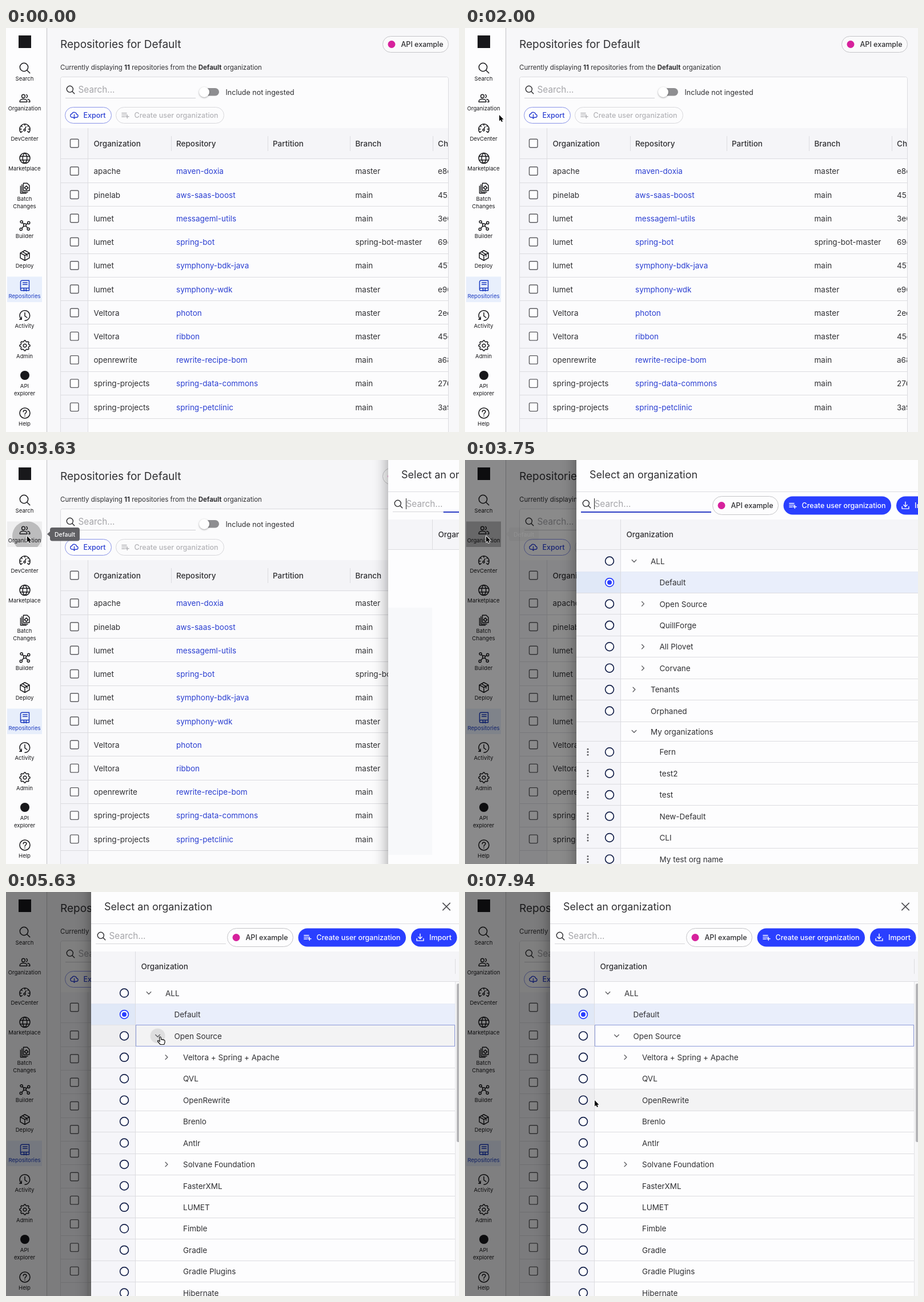
Animation, 793 px wide and 706 px high, one loop 8 s. Source, as an HTML page with a canvas:

```html
<!DOCTYPE html>
<html lang="en">
<head>
<meta charset="utf-8">
<title>Organization picker</title>
<style>
html, body { margin: 0; width: 100%; height: 100%; overflow: hidden; background: #f7f7f9; }
canvas { display: block; }
</style>
</head>
<body>
<canvas id="stage" width="793" height="706"></canvas>
<script>
const ctx = document.getElementById('stage').getContext('2d');
const W = 793, H = 706, LOOP = 8000, STEP = 62.5;
const INK = '#303033', DARK = '#18181b', BLUE = '#2b3fd2', VIVID = '#2a3fff', LINE = '#dcdce0', PINK = '#d6219c';
const BODY = 13.5;
const DRAWER_X = 149, ROW = 37.43, ROWS_TOP = 157.8;
const OPEN_AT = 3613.2, OPEN_MS = 209, PRESS_AT = 3500, EXPAND_AT = 5390;

const clamp = v => Math.min(1, Math.max(0, v));
const span = (t, a, b) => clamp((t - a) / (b - a));
const smooth = v => v * v * (3 - 2 * v);

// Cubic easing with control points (x1, 0) and (x2, 1).
function bezier(x, x1, x2) {
  let lo = 0, hi = 1;
  for (let i = 0; i < 24; i++) {
    const s = (lo + hi) / 2, r = 1 - s;
    if (3 * r * r * s * x1 + 3 * r * s * s * x2 + s ** 3 < x) lo = s; else hi = s;
  }
  return 3 * (1 - lo) * lo * lo + lo ** 3;
}

// ---- drawing helpers ----
function rect(x, y, w, h, color) { ctx.fillStyle = color; ctx.fillRect(x, y, w, h); }
const hline = (x1, x2, y, color = LINE, w = 1) => rect(x1, Math.round(y), x2 - x1, w, color);
const vline = (x, y1, y2, color = LINE) => rect(Math.round(x), y1, 1, y2 - y1, color);

function text(str, x, y, size, color = INK, weight = 400, align = 'left') {
  ctx.font = `${weight} ${size}px Inter, sans-serif`;
  ctx.fillStyle = color;
  ctx.textAlign = align;
  ctx.fillText(str, x, y + size * 0.36);
  return ctx.measureText(str).width;
}
function box(x, y, w, h, r, fill, stroke, lw = 1) {
  ctx.beginPath();
  ctx.roundRect(x, y, w, h, r);
  if (fill) { ctx.fillStyle = fill; ctx.fill(); }
  if (stroke) { ctx.strokeStyle = stroke; ctx.lineWidth = lw; ctx.stroke(); }
}
function disc(x, y, r, fill, stroke, lw) { box(x - r, y - r, 2 * r, 2 * r, r, fill, stroke, lw); }

function icon(path, x, y, size, color = DARK, lw = 1.5) {
  const k = size / 24;
  ctx.save();
  ctx.translate(x - size / 2, y - size / 2);
  ctx.scale(k, k);
  ctx.strokeStyle = color;
  ctx.lineWidth = lw / k;
  ctx.lineJoin = ctx.lineCap = 'round';
  ctx.stroke(new Path2D(path));
  ctx.restore();
}
const ring = (x, y, r) => `M${x + r} ${y}a${r} ${r} 0 1 1 ${-2 * r} 0a${r} ${r} 0 1 1 ${2 * r} 0`;

function gearPath() {
  let d = ring(12, 12, 3.4);
  for (let i = 0; i < 32; i++) {
    const a = (i - 0.5) / 32 * 2 * Math.PI, r = i % 4 < 2 ? 10.8 : 8.6;
    d += `${i ? 'L' : 'M'}${12 + r * Math.cos(a)} ${12 + r * Math.sin(a)}`;
  }
  return d + 'Z';
}
const ICON = {
  search: ring(10.2, 10.2, 8.6) + 'M16.4 16.4L22.5 22.5',
  people: ring(9, 8, 3.5) + 'M1.5 20v-1.5c0-3 4-4.5 7.5-4.5s7.5 1.5 7.5 4.5V20zM15 4.7a3.5 3.5 0 0 1 0 6.6M18 14.3c3 .7 4.5 2.2 4.5 4.2V20h-2.5',
  gauge: 'M3.2 21A11 11 0 1 1 20.8 21L17.5 19M3.2 21L6.5 19M1.5 14h3.2M19.3 14h3.2M12 3.4v3M4.4 6.8l2 2M19.6 6.8l-1.5 1.5M12 14l2.5-5' + ring(11.5, 16, 2),
  globe: ring(12, 12, 10.8) + 'M12 1.2c-6 5-6 16.6 0 21.6c6-5 6-16.6 0-21.6M2.5 8h19M2.5 16h19',
  batch: 'M9 1.5h8l4.5 4.5v11H9zM6 4.5v15.5h12M3 7.5v15h12' + ring(15, 11, 2.8) + 'M15 6.9v1.3M15 13.8v1.3M11 11h1.2M17.8 11h1.2',
  nodes: ring(12, 11, 2.8) + ring(5, 4.5, 2.5) + ring(20, 6.5, 2.5) + ring(4, 20, 2.5) + ring(19.5, 19.5, 2.5) + 'M7 6.3l3 2.8M14.5 10l3-2M10 13l-4 5M14 13l4 4.6',
  cube: 'M12 1.5L21.5 6.8V17.2L12 22.5L2.5 17.2V6.8zM2.5 6.8L12 12L21.5 6.8M12 12V22.5M7 4.3l9.6 5.4v4',
  book: 'M21 17.5V1.5H6a3 3 0 0 0-3 3V20a2.5 2.5 0 0 0 2.5 2.5H9M21 17.5H6a2.8 2.8 0 0 0-3 2.5M21 17.5v5h-5M10 17.5v6l2.5-2l2.5 2v-6M8 6h9M8 10h9',
  history: 'M5 20A10.5 10.5 0 1 1 12 22.5M5 20v-5M5 20H.8M12 6v7l4.5 3.2',
  gear: gearPath(),
  help: ring(12, 12, 10.8) + 'M8.7 9.2c.2-4.4 6.8-4.2 6.7-.2c-.1 2.8-3.3 2.6-3.4 5.6M12 17.8v.4',
  cloud: 'M7 18H6a5 5 0 0 1-.6-9.9A7 7 0 0 1 18.8 9.5A4.3 4.3 0 0 1 19 18h-2M12 10v11M8.5 17.5L12 21l3.5-3.5',
  listAdd: 'M3 6h13M3 11h13M3 16h8M18 11v9M13.5 15.5h9',
  tray: 'M12 2v13M7 10.5l5 5l5-5M2.5 15v6h19v-6',
  close: 'M3 3L21 21M21 3L3 21',
  right: 'M8.5 5l7 7l-7 7',
  down: 'M5 8.5l7 7l7-7'
};

// ---- main page ----
const MENU = [
  ['search', 70, 'Search'], ['people', 122.5, 'Organization'], ['gauge', 175, 'DevCenter'],
  ['globe', 227.5, 'Marketplace'], ['batch', 280, 'Batch', 'Changes'], ['nodes', 345, 'Builder'],
  ['cube', 397.5, 'Deploy'], ['book', 450, 'Repositories'], ['history', 502.5, 'Activity'],
  ['gear', 555, 'Admin'], ['dot', 607, 'API', 'explorer'], ['help', 673, 'Help']
];
const REPOS = [
  ['apache', 'maven-doxia', 'master', 'e8c1'], ['pinelab', 'aws-saas-boost', 'main', '4521'],
  ['lumet', 'messageml-utils', 'main', '3e07'], ['lumet', 'spring-bot', 'spring-bot-master', '69c4'],
  ['lumet', 'symphony-bdk-java', 'main', '4570'], ['lumet', 'symphony-wdk', 'master', 'e902'],
  ['Veltora', 'photon', 'master', '2ee8'], ['Veltora', 'ribbon', 'master', '45c3'],
  ['openrewrite', 'rewrite-recipe-bom', 'main', 'a683'],
  ['spring-projects', 'spring-data-commons', 'main', '2761'],
  ['spring-projects', 'spring-petclinic', 'main', '3a95']
];

function sidebar(t) {
  rect(0, 0, 71, H, '#fdfdfe');
  vline(71, 0, H, '#c2c2c6');
  box(22, 13, 22, 22, 0, DARK);
  rect(2, 434.5, 61, 44.5, '#e8effc');
  const hover = span(t, 3400, 3480) * (1 - span(t, 3850, 4000));
  if (hover > 0) {
    ctx.save();
    ctx.globalAlpha = hover;
    rect(2, 107.5, 61, 44.5, '#f0f0f1');
    ctx.beginPath();
    ctx.rect(2, 107.5, 61, 44.5);
    ctx.clip();
    if (t >= PRESS_AT) disc(37, 133, 10 + 16 * span(t, PRESS_AT, 3625) + 22 * span(t, 3625, 3740), '#bdbdbe');
    ctx.restore();
  }
  for (const [name, y, ...labels] of MENU) {
    const color = name === 'book' ? '#1c3cc0' : DARK;
    if (name === 'dot') disc(33, y, 8, DARK);
    else icon(ICON[name], 33, y, 20, color);
    labels.forEach((s, i) => text(s, 32.5, y + 18.5 + 13 * i, 9.6, color, 400, 'center'));
  }
}
function searchField(x, y) {
  icon(ICON.search, x, y, 15.5, '#2b2b2e', 1.4);
  text('Search...', x + 13.5, y - 1, 15.3, '#a5a5a9');
}
function pill(x, y, w, h, label, glyph, color, fill, border) {
  box(x + 0.5, y + 0.5, w - 1, h - 1, h / 2, fill, border);
  const cy = y + h / 2;
  if (glyph === 'dot') disc(x + 16, cy, 6.5, PINK);
  else icon(ICON[glyph], x + 16.5, cy, 15, color, 1.4);
  text(label, x + 32.5, cy, 12.5, color, 500);
}
const checkbox = y => box(112.5, y - 7.2, 14.5, 14.5, 2, '#fdfdfe', '#5c5c60', 1.4);

function page(t) {
  rect(0, 0, W, H, '#f7f7f9');
  sidebar(t);
  text('Repositories for Default', 95, 28, 19);
  pill(659, 14, 116, 29, 'API example', 'dot', INK, '#fafafb', '#c4c4c8');
  let x = 95;
  [['Currently displaying '], ['11', 700], [' repositories from the '], ['Default', 700], [' organization']]
    .forEach(([s, weight]) => { x += text(s, x, 68.5, 11.5, INK, weight); });

  rect(95, 85, 680, H, '#fcfcfd');
  searchField(113, 108);
  hline(104, 332, 122, '#cfcfd3');
  box(345, 105, 28, 13.5, 7, '#8e8e91');
  ctx.save();
  ctx.shadowColor = 'rgba(0,0,0,.35)';
  ctx.shadowBlur = 3;
  ctx.shadowOffsetY = 1;
  disc(347, 112, 9, '#fff');
  ctx.restore();
  text('Include not ingested', 384.5, 112, 12.5);
  pill(103, 138, 82, 29, 'Export', 'cloud', BLUE, '#fdfdfe', '#8993e8');
  pill(192, 138, 190, 29, 'Create user organization', 'listAdd', '#b4b4b8', null, '#d8d8dc');

  rect(95, 175, 680, 53, '#f5f5f8');
  rect(95, 228, 49, H, '#f5f5f9');
  vline(143, 175, H);
  hline(95, 775, 228);
  checkbox(201.5);
  const cols = [153.5, 298, 467, 611.5, 756];
  ctx.save();
  ctx.beginPath();
  ctx.rect(95, 85, 679, H);
  ctx.clip();
  ['Organization', 'Repository', 'Partition', 'Branch', 'Changeset'].forEach((s, i) => {
    text(s, cols[i], 202, BODY, INK, 500);
    if (i) vline(cols[i] - 9.5, 189, 215);
  });
  REPOS.forEach(([org, repo, branch, hash], i) => {
    const y = 250 + 41.23 * i;
    checkbox(y);
    [org, repo, '', branch, hash].forEach((s, c) => text(s, cols[c], y + 0.5, BODY, c === 1 ? BLUE : INK));
    hline(95, 775, y + 20);
  });
  ctx.restore();
  box(95.5, 85.5, 679, 700, 3, null, LINE);
}

function tooltip(t) {
  const alpha = span(t, 3440, 3520) * (1 - 0.9 * span(t, 3640, 3750)) * (1 - span(t, 3755, 3810));
  if (alpha <= 0) return;
  ctx.save();
  ctx.globalAlpha = alpha;
  box(77, 118, 52, 23.5, 4, '#606064');
  ctx.beginPath();
  ctx.moveTo(72, 129.5);
  ctx.lineTo(77.5, 124.5);
  ctx.lineTo(77.5, 134.5);
  ctx.fill();
  text('Default', 103, 130, 10.5, '#fff', 500, 'center');
  ctx.restore();
}

// ---- drawer: [label, depth, chevron, kind] ----
const HEAD = [['ALL', 0, 'down'], ['Default', 1]];
const CLOSED = [
  ...HEAD, ['Open Source', 1, 'right'], ['QuillForge', 1], ['All Plovet', 1, 'right'], ['Corvane', 1, 'right'],
  ['Tenants', 0, 'right'], ['Orphaned', 0], ['My organizations', 0, 'down', 'group'],
  ...['Fern', 'test2', 'test', 'New-Default', 'CLI', 'My test org name'].map(s => [s, 1, '', 'own'])
];
const EXPANDED = [
  ...HEAD, ['Open Source', 1, 'down'], ['Veltora + Spring + Apache', 2, 'right'], ['QVL', 2], ['OpenRewrite', 2],
  ['Brenlo', 2], ['Antlr', 2], ['Solvane Foundation', 2, 'right'],
  ...['FasterXML', 'LUMET', 'Fimble', 'Gradle', 'Gradle Plugins', 'Hibernate'].map(s => [s, 2])
];

function drawerRows(t, L, cursor) {
  const expanded = t >= EXPAND_AT, right = expanded ? L + 637 : W;
  const active = t >= 4900 && cursor.x > L;
  let y = ROWS_TOP;
  (expanded ? EXPANDED : CLOSED).forEach(([label, depth, chevron, kind], i) => {
    const h = kind === 'group' ? 34.3 : ROW, cy = y + h / 2;
    const hover = active && cursor.y >= y && cursor.y < y + h;
    if (i === 1) {
      rect(L, y, 77, h, '#e0e8f7');
      rect(L + 77, y, right - L - 77, h, '#e9eefb');
    } else if (hover) {
      rect(L, y, 77, h, '#eeeef0');
      rect(L + 77, y, right - L - 77, h, '#f3f3f4');
    }
    hline(L, right, y + h - 0.7);
    if (kind !== 'group') {
      disc(L + 58, cy, 7.4, '#fdfdfe', i === 1 ? VIVID : '#14204a', 1.7);
      if (i === 1) disc(L + 58, cy, 4, VIVID);
    }
    if (kind === 'own') [-5, 0, 5].forEach(d => disc(L + 20, cy + d, 1.5, '#5c5c60'));
    const indent = 15.5 * depth;
    if (hover && i === 2 && Math.abs(cursor.x - L - 117) < 13) {
      disc(L + 101 + indent, cy, 13, expanded ? '#dededf' : '#e6e6e8');
    }
    if (chevron) icon(ICON[chevron], L + 101 + indent, cy, 13, '#606064', 1.4);
    text(label, L + 130 + indent, cy + 0.3, BODY);
    y += h;
  });
  vline(L + 77, 104, H);
  if (expanded) {
    ctx.strokeStyle = '#8c9ad9';
    ctx.lineWidth = 1;
    ctx.strokeRect(L + 78.5, 232.5, 558, 37);
    rect(L + 637, 157, 7, H, '#f7f7f8');
    vline(L + 637, 117, 143);
    vline(L + 637, 157, H, '#e4e4e7');
    box(789, 160, 5, 277, 2.5, '#b5b5b8');
  }
}

function drawer(t, cursor) {
  if (t < OPEN_AT) return;
  const p = span(t, OPEN_AT, OPEN_AT + OPEN_MS);
  const slide = bezier(p, 0, 0.2);
  rect(0, 0, W, H, `rgba(0,0,0,${0.5 * bezier(p, 0.4, 0.2)})`);
  tooltip(t);
  const L = Math.round(W - (W - DRAWER_X) * slide);

  ctx.save();
  ctx.shadowColor = 'rgba(0,0,0,.4)';
  ctx.shadowBlur = 24;
  rect(L, -40, W, H + 80, '#fdfdfe');
  ctx.restore();
  text('Select an organization', L + 23, 25.5, 18);
  icon(ICON.close, L + 622, 25.5, 16.5, '#505054', 1.7);
  hline(L, W, 55);
  searchField(L + 18, 77);
  hline(L + 8, L + 236, 90, '#d6d6da');
  const focused = t < EXPAND_AT - 60;
  if (focused) {
    const half = 114 * Math.min(1, slide * 1.15);
    hline(L + 122 - half, L + 122 + half, 90, '#2b3cc4', 2);
    if ((t - 3600) % 1060 < 530) vline(L + 31, 67, 86, '#222');
  }
  pill(L + 238, 63, 116, 33, 'API example', 'dot', INK, '#fdfdfe', '#c4c4c8');
  pill(L + 362, 63, 189.5, 33, 'Create user organization', 'listAdd', '#fff', VIVID);
  pill(L + 559.5, 63, 81.5, 33, 'Import', 'tray', '#fff', VIVID);
  rect(L, 104, W - L, 53, '#f5f5f8');
  text('Organization', L + 87.5, 130.5, BODY, INK, 500);
  vline(L + 77, 104, 157);
  hline(L, W, 156);
  if (t < 3680) {
    rect(L, 258, 77, 432, '#f7f8fa');
    return;
  }
  rect(L, 157, 77, H, '#f5f5f9');
  drawerRows(t, L, cursor);
}

// ---- pointer: [time, x, y] ----
const MOVES = [
  [1750, 72, 164], [1940, 60, 152], [3300, 60, 152], [3480, 37, 133], [4060, 37, 133], [4300, 68, 151],
  [4900, 68, 151], [5250, 270, 253], [5900, 270, 253], [6400, 227, 364], [LOOP, 227, 364]
];
function cursorAt(t) {
  if (t < MOVES[0][0]) return { x: -50, y: -50 };
  const i = MOVES.findIndex(m => m[0] > t);
  const [t0, x0, y0] = MOVES[i - 1], [t1, x1, y1] = MOVES[i];
  const k = smooth(span(t, t0, t1));
  return { x: x0 + (x1 - x0) * k, y: y0 + (y1 - y0) * k };
}
const ARROW = new Path2D('M0 0V10.5L2.4 8.4L4 12L5.9 11.2L4.3 7.7H7.5Z');
const HAND = new Path2D('M-1.5 1.5C-1.5-.5 1-.5 1.2 1.5L1.7 5C2.6 4.2 3.8 4.5 4 5.5C5 4.3 5.9 5 6.1 6C7.2 5.2 8 6 8 7.5V10L6.7 13.5H.2L-4.5 8C-5 6.5-3.5 6-2.3 7.2L-.7 8.3Z');

function pointer(t, { x, y }) {
  const onLink = t >= 5200 && t < 6000 && Math.abs(x - 268) < 10;
  ctx.save();
  ctx.translate(x, y);
  ctx.lineJoin = 'round';
  if (onLink) {
    ctx.fillStyle = '#fff';
    ctx.strokeStyle = '#111';
    ctx.lineWidth = 1.2;
    ctx.fill(HAND);
    ctx.stroke(HAND);
  } else {
    ctx.strokeStyle = '#fff';
    ctx.lineWidth = 1.8;
    ctx.stroke(ARROW);
    ctx.fillStyle = '#000';
    ctx.fill(ARROW);
  }
  ctx.restore();
}

function draw(now) {
  // Motion advances at 16 steps a second.
  const t = Math.floor((now % LOOP + 5) / STEP) * STEP % LOOP;
  const cursor = cursorAt(t);
  page(t);
  if (t < OPEN_AT) tooltip(t);
  drawer(t, cursor);
  pointer(t, cursor);
}
function tick() {
  draw(performance.now());
  requestAnimationFrame(tick);
}
tick();
</script>
</body>
</html>
```
